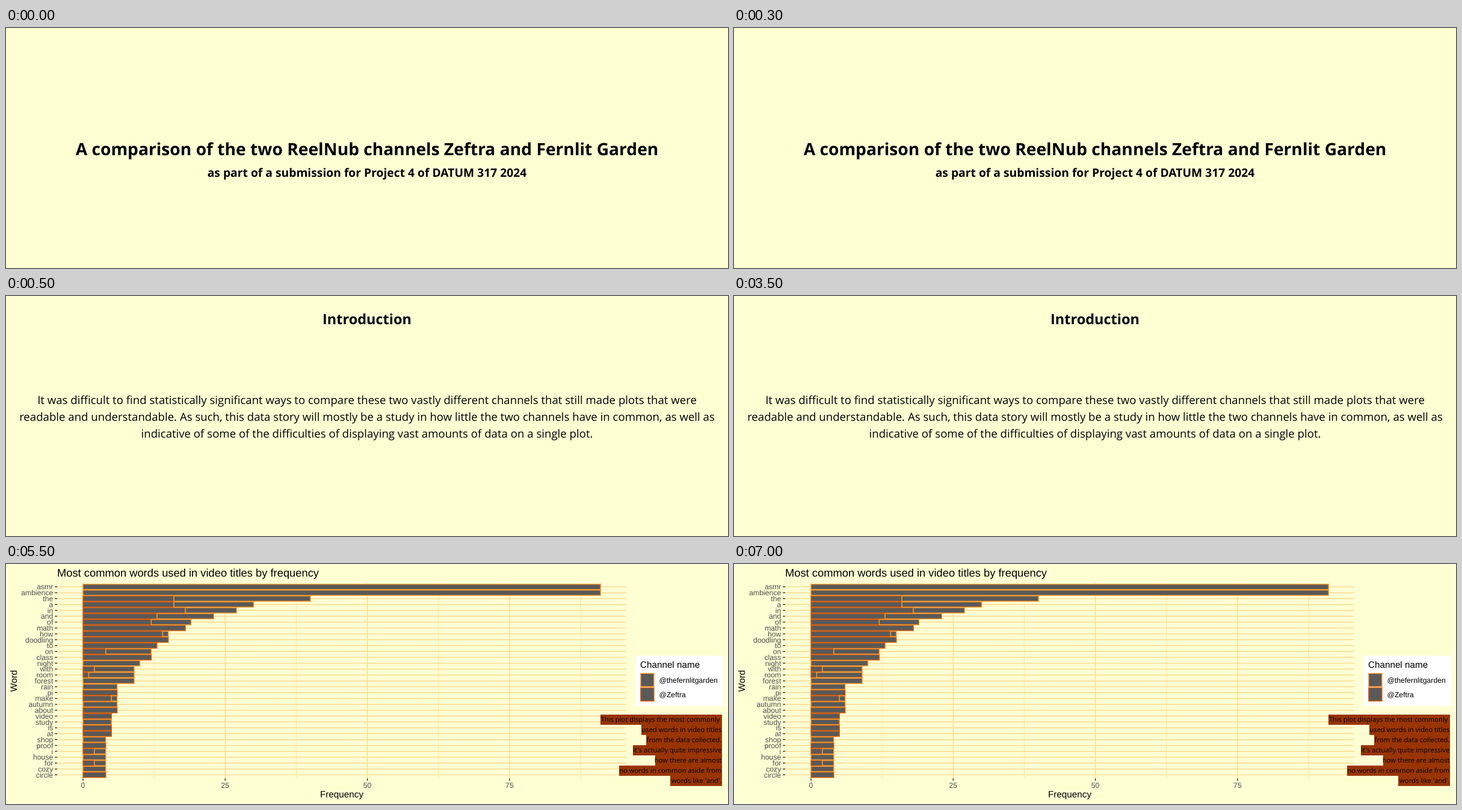
Recreate the animation shown at these times as an HTML page. Size 1200x400 px, loop 8 s.

```html
<!DOCTYPE html>
<html lang="en">
<head>
<meta charset="utf-8">
<title>Channel comparison</title>
<style>
  html, body { margin: 0; width: 100%; height: 100%; overflow: hidden; background: #ffffd4; }
  svg { display: block; width: 1200px; height: 400px; text-rendering: geometricPrecision; }
  .slide { visibility: hidden; }
  .prose { font-family: "Open Sans", "Noto Sans", sans-serif; text-anchor: middle; }
  .bold { font-weight: 700; }
  .chart { font-family: "Liberation Sans", Arial, sans-serif; font-size: 15.28px; }
  .tick { font-size: 12.22px; fill: #4d4d4d; }
  .mid { text-anchor: middle; }
  .end { text-anchor: end; }
  .note { font: 11.28px "Open Sans", "Noto Sans", sans-serif; text-anchor: end; }
</style>
</head>
<body>
<svg viewBox="0 0 1200 400">
  <g class="slide prose bold">
    <text x="600" y="212" font-size="28.2">A comparison of the two ReelNub channels Zeftra and Fernlit Garden</text>
    <text x="600" y="248" font-size="19.3">as part of a submission for Project 4 of DATUM 317 2024</text>
  </g>
  <g class="slide prose" font-size="18.63">
    <text class="bold" x="600" y="47" font-size="23.5">Introduction</text>
    <text x="600" y="180">It was difficult to find statistically significant ways to compare these two vastly different channels that still made plots that were</text>
    <text x="600" y="208">readable and understandable. As such, this data story will mostly be a study in how little the two channels have in common, as well as</text>
    <text x="600" y="236">indicative of some of the difficulties of displaying vast amounts of data on a single plot.</text>
  </g>
  <g class="slide chart" id="chart"></g>
</svg>
<script>
const LIGHT = '#fe9929', DARK = '#d95f0e', GRID = '#fed98e';
const LEFT = 85, RIGHT = 1031, TOP = 32.2, BOTTOM = 357.4;

// word, count in the second channel, count in the first channel
const words = `asmr 0 91,ambience 0 91,the 16 24,a 16 14,in 18 9,and 13 10,of 12 7,math 18 0,
how 14 1,doodling 15 0,to 13 0,on 4 8,class 12 0,night 0 10,with 2 7,room 1 8,forest 0 9,rain 0 6,
pi 6 0,make 5 1,autumn 0 6,about 6 0,video 5 0,study 0 5,is 5 0,at 5 0,shop 0 4,proof 4 0,i 2 2,
house 0 4,for 2 2,cozy 0 4,circle 4 0`.split(',').map(row => row.trim().split(' '));

// left edge of the band, text, right edge of the text
const notes = [
  [988, 'This plot displays the most commonly', 1186.5],
  [1056, 'used words in video titles'],
  [1064, 'from the data collected.'],
  [1042, "It's actually quite impressive"],
  [1079, 'how there are almost'],
  [1019, 'no words in common aside from'],
  [1104, "words like 'and'."]
];

const xAt = n => 128 + n * 9.452;
const yAt = i => 38.1 + i * 9.79;
const line = (x1, y1, x2, y2, color, width = 1.48) =>
  `<path d="M${x1} ${y1}L${x2} ${y2}" stroke="${color}" stroke-width="${width}"/>`;
const rect = (x, y, w, h, fill, stroke = 'none') =>
  `<rect x="${x}" y="${y}" width="${w}" height="${h}" fill="${fill}" stroke="${stroke}" stroke-width="1.48"/>`;
const text = (x, y, str, cls = '', more = '') =>
  `<text x="${x}" y="${y}" class="${cls}" ${more}>${str}</text>`;
const bar = (from, to, i, color) =>
  to > from ? rect(xAt(from), yAt(i) - 4.4, xAt(to) - xAt(from), 8.8, '#595959', color) : '';

function drawChart() {
  let s = rect(0, 0, 1200, 400, 'none', '#fff');
  for (let n = 12.5; n < 100; n += 25) s += line(xAt(n), TOP, xAt(n), BOTTOM, GRID, 0.74);
  words.forEach((w, i) => s += line(LEFT, yAt(i), RIGHT, yAt(i), GRID));
  for (let n = 0; n < 100; n += 25) {
    s += line(xAt(n), TOP, xAt(n), BOTTOM, GRID);
    s += line(xAt(n), BOTTOM, xAt(n), BOTTOM + 3.8, '#333');
    s += text(xAt(n), 372.6, n, 'tick mid');
  }
  words.forEach(([word, second], i) => {
    s += line(LEFT - 3.8, yAt(i), LEFT, yAt(i), '#333');
    s += text(78.3, yAt(i) + 4.3, word, 'tick end');
    s += bar(0, +second, i, DARK);
  });
  words.forEach(([, second, first], i) => s += bar(+second, +second + +first, i, LIGHT));

  s += text(LEFT, 21, 'Most common words used in video titles by frequency', '', 'font-size="18.33"');
  s += text(558, 389, 'Frequency', 'mid');
  s += text(0, 0, 'Word', 'mid', 'transform="translate(18 194.8) rotate(-90)"');

  s += rect(1046.2, 153, 146.2, 84, '#fff') + text(1053.9, 172.6, 'Channel name');
  [['@thefernlitgarden', LIGHT], ['@Zeftra', DARK]].forEach(([name, color], i) => {
    s += rect(1054.9, 182.4 + i * 24, 22, 22, '#595959', color);
    s += text(1085.5, 197.7 + i * 24, name, '', 'font-size="12.22"');
  });

  notes.forEach(([x, str, end = 1189.5], i) => {
    s += rect(x, 251 + i * 17, 1190 - x, 17, '#993404') + text(end, 263 + i * 17, str, 'note');
  });
  document.getElementById('chart').innerHTML = s;
}

const slides = document.querySelectorAll('.slide');
function show() {
  const t = performance.now() % 8000;
  const current = t < 500 ? 0 : t < 5500 ? 1 : 2;
  slides.forEach((el, i) => el.style.visibility = i === current ? 'visible' : 'hidden');
  requestAnimationFrame(show);
}

drawChart();
show();
</script>
</body>
</html>
```
